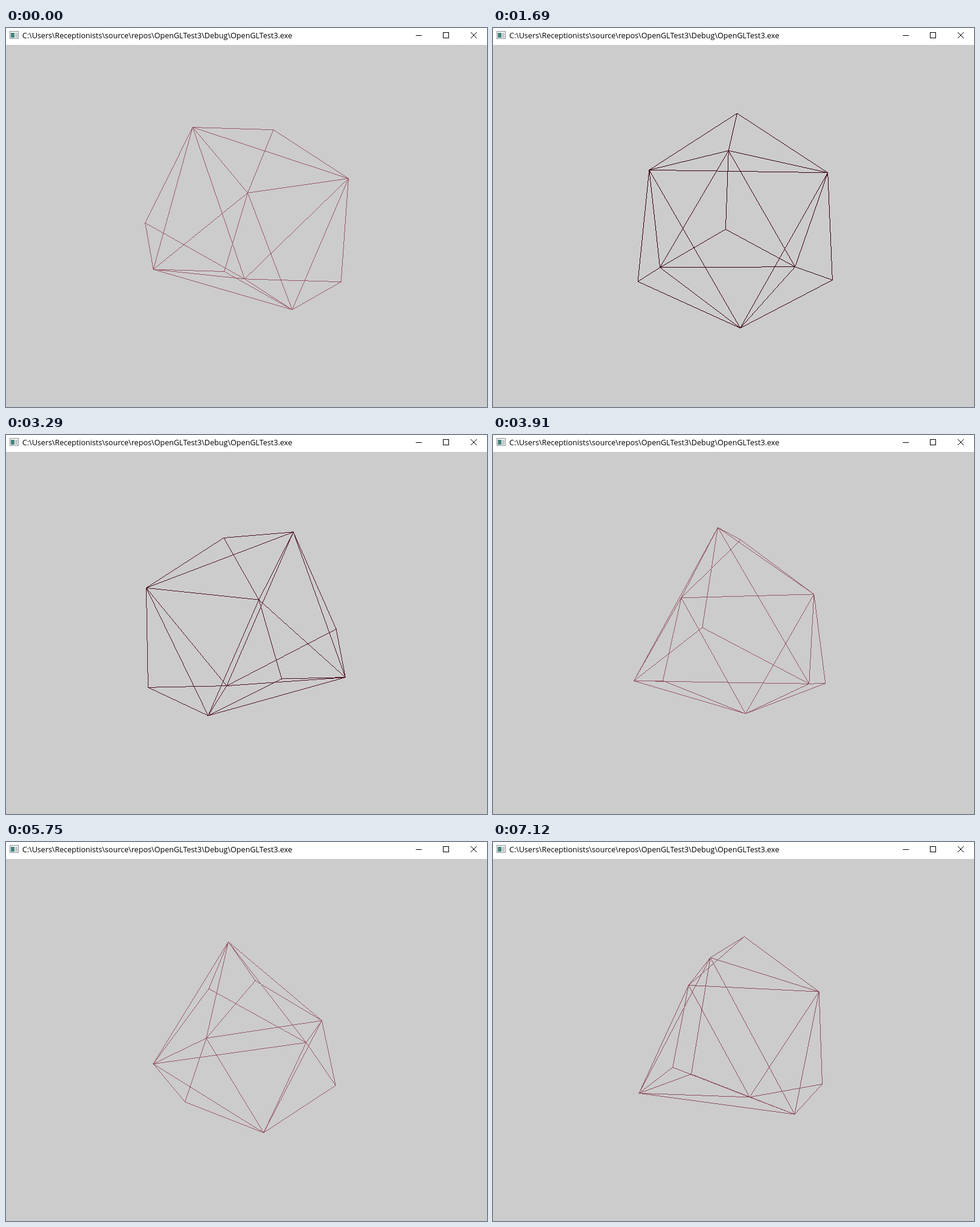
These frames come from a looping animation (797x628 px, 7370 ms). An HTML page with a canvas:

```html
<!DOCTYPE html>
<html lang="en">
<head>
<meta charset="utf-8">
<title>Wireframe sphere</title>
<style>
  html, body { margin: 0; width: 100%; height: 100%; overflow: hidden; background: #ccc; }
  canvas, svg { position: absolute; left: 0; top: 0; display: block; }
  text { font: 12.6px "Open Sans", "Noto Sans", sans-serif; fill: #000; }
</style>
</head>
<body>
<canvas id="view" width="797" height="628"></canvas>
<svg width="797" height="28" viewBox="0 0 797 28">
  <rect width="797" height="28" fill="#fff"/>
  <g shape-rendering="crispEdges">
    <rect x="6.5" y="5.5" width="14" height="12" fill="#f4f4f4" stroke="#8a9097"/>
    <rect x="8" y="8" width="6" height="8" fill="#43857c"/>
    <rect x="15" y="8" width="4" height="8" fill="#c3c8cc"/>
    <path d="M679 12.5h10" stroke="#000"/>
    <rect x="724.5" y="7.5" width="9" height="9" fill="none" stroke="#000"/>
  </g>
  <path d="M770 7l10 10M780 7l-10 10" stroke="#000" fill="none"/>
  <text x="27" y="17">C:\Users\Receptionists\source\repos\OpenGLTest3\Debug\OpenGLTest3.exe</text>
</svg>
<script>
const LOOP = 7370, TICK = 32.35, STEP = 0.05;
const CX = 398.5, CY = 328, FOCAL = 300 / Math.tan(Math.PI / 8), RADIUS = 4;
const HOLDS = [[2520, 2590], [3290, 3370], [6270, 6350], [6560, 6630]];
const ctx = document.getElementById("view").getContext("2d");

// Tetrahedron subdivided once, with the midpoints pushed out to the unit sphere.
const points = [
  [0, 0, -1],
  [0, 0.942809, 0.333333],
  [-0.816497, -0.471405, 0.333333],
  [0.816497, -0.471405, 0.333333]
];
const edges = [];
const mids = [];
for (let i = 0; i < 4; i++) {
  for (let j = i + 1; j < 4; j++) {
    const sum = points[i].map((v, k) => v + points[j][k]);
    const len = Math.hypot(...sum);
    const id = points.push(sum.map(v => v / len)) - 1;
    edges.push([i, id], [j, id]);
    for (const m of mids) {
      const shared = [i, j].filter(k => m.ends.includes(k)).length;
      if (shared === 1) edges.push([m.id, id]);
    }
    mids.push({ id, ends: [i, j] });
  }
}

// Number of key repeats since start, counting the first press.
function presses(t, start, max) {
  return t < start ? 0 : Math.min(max, Math.floor((t - start) / TICK) + 1);
}

function poseAt(t) {
  for (const [from, to] of HOLDS) if (t > from && t < to) t = from;
  const yaw = 2.2408 - STEP * presses(t, 310, 114);
  const lift = 0.077 + STEP * ((t >= 4320 ? 1 : 0) + presses(t, 4810, 72));
  const height = -2 * Math.sin(lift);
  return { yaw, pitch: Math.atan2(height, RADIUS), dist: Math.hypot(height, RADIUS) };
}

function project([x, y, z], { yaw, pitch, dist }) {
  const rx = x * Math.cos(yaw) + z * Math.sin(yaw);
  const rz = z * Math.cos(yaw) - x * Math.sin(yaw);
  const ry = y * Math.cos(pitch) - rz * Math.sin(pitch);
  const depth = dist - y * Math.sin(pitch) - rz * Math.cos(pitch);
  return [CX + FOCAL * rx / depth, CY - FOCAL * ry / depth];
}

// One hard pixel for each step along the longer axis.
function drawLine(a, b) {
  const axis = Math.abs(b[0] - a[0]) >= Math.abs(b[1] - a[1]) ? 0 : 1;
  if (a[axis] > b[axis]) [a, b] = [b, a];
  const slope = (b[1 - axis] - a[1 - axis]) / (b[axis] - a[axis]);
  for (let p = Math.floor(a[axis]); p <= Math.floor(b[axis]); p++) {
    const q = Math.floor(a[1 - axis] + slope * (p + 0.5 - a[axis]));
    if (axis === 0) ctx.fillRect(p, q, 1, 1);
    else ctx.fillRect(q, p, 1, 1);
  }
}

function lineColor({ yaw, pitch }) {
  const lit = Math.max(0, Math.cos(yaw - 2.53) * Math.cos(pitch + 0.25));
  const mix = (base, gain) => Math.round(base + gain * lit);
  return `rgb(${mix(56, 102)},${mix(2, 94)},${mix(16, 94)})`;
}

function draw(t) {
  const pose = poseAt(t);
  const flat = points.map(p => project(p, pose));
  ctx.fillStyle = "#ccc";
  ctx.fillRect(0, 0, 797, 628);
  ctx.fillStyle = lineColor(pose);
  for (const [i, j] of edges) drawLine(flat[i], flat[j]);
}

const begin = performance.now();
function frame() {
  draw((performance.now() - begin) % LOOP);
  requestAnimationFrame(frame);
}
frame();
</script>
</body>
</html>
```
